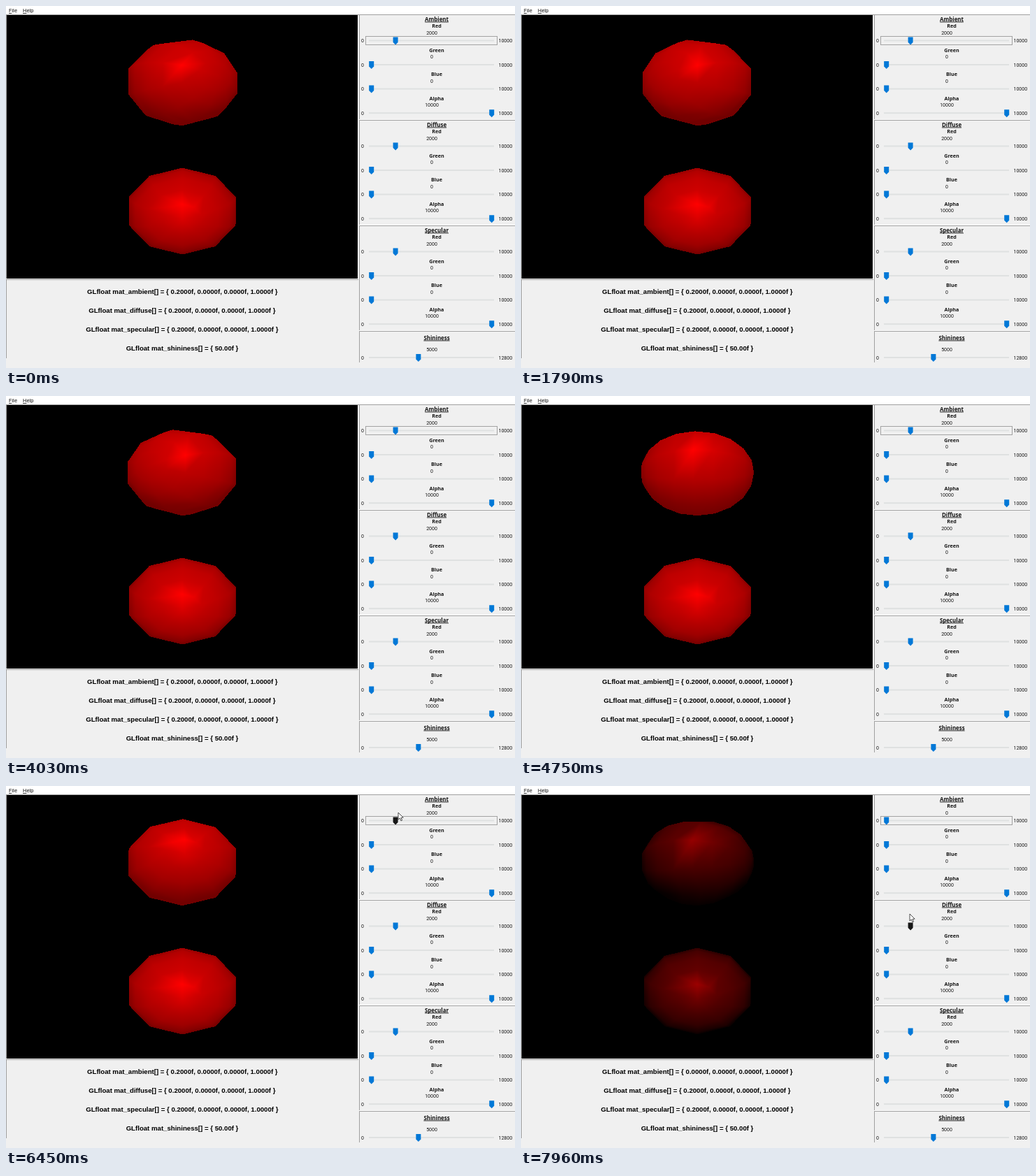
Write an HTML page with a canvas that moves like this. It is 728x518 px and loops after 8 s.

```html
<!DOCTYPE html>
<html lang="en">
<head>
<meta charset="utf-8">
<title>Material lighting</title>
<style>
html, body { margin: 0; width: 100%; height: 100%; overflow: hidden; background: #f0f0f0; }
canvas { display: block; width: 728px; height: 518px; }
</style>
</head>
<body>
<canvas id="stage" width="728" height="518"></canvas>
<script>
const ctx = document.getElementById('stage').getContext('2d');
const LOOP = 8000, STEP = 48.5;
const BG = '#f0f0f0', INK = '#161616', EDGE = '#a0a0a0';
const UI = '"Open Sans", "Noto Sans", sans-serif';
const DIGITS = 'Roboto, "Open Sans", sans-serif';
const RAD = Math.PI / 180;

const clamp = x => Math.max(0, Math.min(1, x));
const ease = x => x * x * (3 - 2 * x);
const span = (t, a, b) => clamp((t - a) / (b - a));

function text(str, x, y, font, align = 'center', color = INK) {
  ctx.font = font;
  ctx.textAlign = align;
  ctx.fillStyle = color;
  ctx.fillText(str, x, y);
}

function rect(x, y, w, h, color) {
  ctx.fillStyle = color;
  ctx.fillRect(x, y, w, h);
}

function shape(points, fill, stroke) {
  ctx.beginPath();
  points.forEach(([x, y]) => ctx.lineTo(x, y));
  ctx.closePath();
  ctx.fillStyle = fill;
  ctx.fill();
  if (stroke) {
    ctx.strokeStyle = stroke;
    ctx.lineWidth = 0.8;
    ctx.stroke();
  }
}

// ---- Spheres: Gouraud shading, seen in perspective ----
const VIEW = { x: 160, y: 40, w: 184, h: 324 };
const CENTER = { x: 252.2, y: 201.4 };
const SCALE = 60.3, ASPECT = 1.334, EYE = 7.5, SIDES = 10;
const LIGHT = [Math.sin(26 * RAD), Math.cos(26 * RAD)];
const HALF = [Math.sin(13 * RAD), Math.cos(13 * RAD)];
const image = ctx.createImageData(VIEW.w, VIEW.h);

function vertex(stack, slice, spin, lift, ambient) {
  const lat = stack * Math.PI / SIDES, lon = slice * 2 * Math.PI / SIDES;
  const r = Math.sin(lat), x0 = -r * Math.sin(lon), y = r * Math.cos(lon), z0 = Math.cos(lat);
  const x = x0 * Math.cos(spin) + z0 * Math.sin(spin);
  const z = z0 * Math.cos(spin) - x0 * Math.sin(spin);
  const diffuse = Math.max(0, y * LIGHT[0] + z * LIGHT[1]);
  const gloss = diffuse > 0 ? Math.max(0, y * HALF[0] + z * HALF[1]) ** 50 : 0;
  const k = SCALE * EYE / (EYE - z);
  return {
    x: CENTER.x + x * k * ASPECT - VIEW.x,
    y: CENTER.y - (y + lift) * k - VIEW.y,
    c: Math.min(255, 6 + 108 * ambient + 92 * diffuse + 70 * gloss)
  };
}

function triangle(a, b, c) {
  const area = (b.x - a.x) * (c.y - a.y) - (b.y - a.y) * (c.x - a.x);
  if (area > -1e-6) return;
  const x0 = Math.max(0, Math.floor(Math.min(a.x, b.x, c.x)));
  const x1 = Math.min(VIEW.w - 1, Math.ceil(Math.max(a.x, b.x, c.x)));
  const y0 = Math.max(0, Math.floor(Math.min(a.y, b.y, c.y)));
  const y1 = Math.min(VIEW.h - 1, Math.ceil(Math.max(a.y, b.y, c.y)));
  for (let y = y0; y <= y1; y++) {
    for (let x = x0; x <= x1; x++) {
      const px = x + 0.5, py = y + 0.5;
      const u = ((b.x - px) * (c.y - py) - (b.y - py) * (c.x - px)) / area;
      const v = ((c.x - px) * (a.y - py) - (c.y - py) * (a.x - px)) / area;
      const w = 1 - u - v;
      if (u < -1e-6 || v < -1e-6 || w < -1e-6) continue;
      image.data[(y * VIEW.w + x) * 4] = u * a.c + v * b.c + w * c.c;
    }
  }
}

function sphere(spin, lift, ambient) {
  for (let i = 0; i < SIDES; i++) {
    for (let j = 0; j < SIDES; j++) {
      const v = (di, dj) => vertex(i + di, j + dj, spin, lift, ambient);
      const a = v(0, 0), b = v(1, 0), c = v(1, 1), d = v(0, 1);
      triangle(a, b, c);
      triangle(a, c, d);
    }
  }
}

function drawScene(step, ambient) {
  rect(1, 13, 502, 377, '#000');
  for (let i = 0; i < image.data.length; i += 4) {
    image.data[i] = 0;
    image.data[i + 3] = 255;
  }
  sphere((34 + 7.88 * step) * RAD, 1.5, ambient);
  sphere(0, -1.5, ambient);
  ctx.putImageData(image, VIEW.x, VIEW.y);
}

// ---- Controls ----
const THUMB = { normal: '#0078d7', hover: '#171717', pressed: '#cccccc' };
const thumbX = part => 522.7 + 172 * part;

function slider(y, value, max, state = 'normal') {
  rect(519, y - 1, 179, 2, '#dfe1e1');
  const x = thumbX(value / max);
  shape([[x - 3.5, y - 5], [x + 3.5, y - 5], [x + 3.5, y + 2.5], [x, y + 6], [x - 3.5, y + 2.5]], THUMB[state]);
  text('0', 510, y + 2.7, '7px ' + DIGITS);
  text(max, 714.3, y + 2.7, '7px ' + DIGITS);
}

function title(str, y) {
  const font = 'bold 7.9px ' + UI;
  text(str, 616, y, font);
  const w = ctx.measureText(str).width;
  rect(616 - w / 2, y + 1, w, 0.9, INK);
}

function group(name, y, red, state) {
  title(name, y + 21.5);
  ['Red', 'Green', 'Blue', 'Alpha'].forEach((label, i) => {
    const top = y + i * 34.55;
    const value = [red, 0, 0, 10000][i];
    text(label, 616, top + 31, 'bold 7.2px ' + UI);
    text(value, 609, top + 40.7, '7px ' + DIGITS);
    slider(top + 49.5, value, 10000, i ? 'normal' : state);
  });
}

function drawPanels(red, ambientState, diffuseState) {
  rect(0, 0, 728, 518, BG);
  rect(0, 0, 728, 12, '#fff');
  text('File', 4, 8.8, '7.6px ' + DIGITS, 'left');
  text('Help', 24, 8.8, '7.6px ' + DIGITS, 'left');
  rect(4, 10, 4.2, 0.8, INK);
  rect(24, 10, 5.4, 0.8, INK);

  rect(0, 12, 728, 1, EDGE);
  rect(0, 12, 1, 378, EDGE);
  rect(0, 391, 504, 1, EDGE);
  rect(0, 391, 1, 113, EDGE);
  rect(503, 13, 1, 378, '#fff');
  rect(505, 13, 1, 497, EDGE);
  [163, 314, 465].forEach(y => {
    rect(505, y - 1, 223, 1, '#fff');
    rect(505, y, 223, 1, EDGE);
  });

  group('Ambient', 0, red, ambientState);
  group('Diffuse', 151, 2000, diffuseState);
  group('Specular', 302, 2000, 'normal');
  title('Shininess', 477.5);
  text(5000, 609, 493.7, '7px ' + DIGITS);
  slider(503, 5000, 12800);

  ctx.strokeStyle = '#555';
  ctx.lineWidth = 1;
  ctx.setLineDash([1, 1]);
  ctx.strokeRect(514.5, 43.5, 188, 12);
  ctx.setLineDash([]);

  const bold = 'bold 9.65px "Liberation Sans", Arial, sans-serif';
  const vector = (name, r) => `GLfloat mat_${name}[] = { ${(r / 10000).toFixed(4)}f, 0.0000f, 0.0000f, 1.0000f }`;
  text(vector('ambient', red), 252.3, 411.7, bold, 'center', '#000');
  text(vector('diffuse', 2000), 251.8, 438.8, bold, 'center', '#000');
  text(vector('specular', 2000), 251.8, 465.9, bold, 'center', '#000');
  text('GLfloat mat_shininess[] = { 50.00f }', 252, 493, bold, 'center', '#000');
}

// ---- Pointer ----
const ENTER = 5820, ARRIVE = 6350, PRESS = 6620, RELEASE = 7430, LEAVE = 7470, REST = 7900;

function pointerAt(t, red) {
  if (t < ENTER) return null;
  if (t < PRESS) {
    const k = ease(span(t, ENTER, ARRIVE));
    return [714 - 153 * k, 9 + 29 * k + 8 * span(t, 6500, PRESS)];
  }
  if (t < LEAVE) return [thumbX(red / 10000) + 4, 46];
  const k = ease(span(t, LEAVE, REST)), m = 1 - k;
  return [m * m * 526.7 + 2 * m * k * 640 + k * k * 556, m * m * 47 + 2 * m * k * 125 + k * k * 183];
}

function drawPointer([x, y]) {
  const outline = [[0, 0], [0, 10], [2.3, 8], [4, 11.8], [5.6, 11], [4, 7.4], [7.2, 7.2]];
  shape(outline.map(([dx, dy]) => [x + dx, y + dy]), '#fff', '#222');
}

function draw(now) {
  const step = Math.floor((now % LOOP + 5) / STEP);
  const t = step * STEP;
  const red = Math.round(2000 * (1 - ease(span(t, PRESS, RELEASE))));
  const pressed = t >= PRESS && t < RELEASE;
  const ambientState = pressed ? 'pressed' : t >= ARRIVE - 50 && t < LEAVE + 50 ? 'hover' : 'normal';
  drawPanels(red, ambientState, t >= REST - 30 ? 'hover' : 'normal');
  drawScene(step, red / 2000);
  const pointer = pointerAt(t, red);
  if (pointer) drawPointer(pointer);
}

const start = performance.now();
function tick() {
  draw(performance.now() - start);
  requestAnimationFrame(tick);
}
tick();
</script>
</body>
</html>
```
